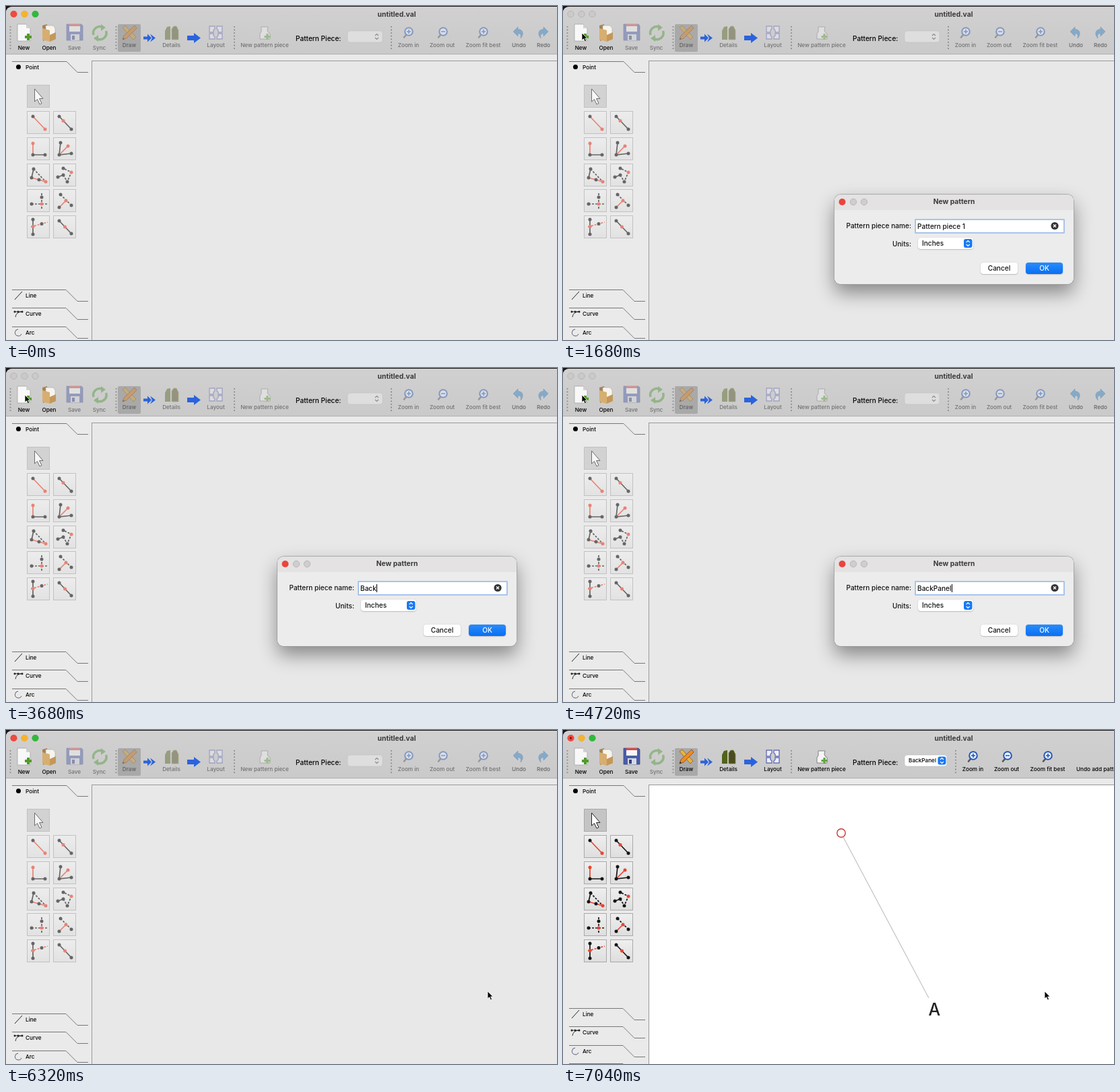
An HTML page that plays this animation: 818 by 496 pixels, repeating every 7120 ms.

```html
<!DOCTYPE html>
<html lang="en">
<head>
<meta charset="utf-8">
<title>New pattern</title>
<style>
  html, body { margin: 0; width: 100%; height: 100%; overflow: hidden; background: #171717; }
  body { position: relative; font: 500 10.1px Inter, "Open Sans", sans-serif; color: #111; }
  svg { position: absolute; left: 0; top: 0; }
  svg text { font-size: 8.2px; fill: #000; }
  text.title { font-size: 10.3px; font-weight: 700; fill: #3b3b3b; }
  text.field { font-size: 10.1px; }
  .mid { text-anchor: middle; }

  /* main window states */
  .dim, .on, .off, .canvas, .zoom, .tabs, .lights, .dialog, .pointer, .name::before, .name::after {
    animation: 7120ms step-end infinite;
  }
  .dim { --low: .44; animation-name: enable; }
  .tools .dim { --low: .62; }
  .on { animation-name: appear; }
  .off { animation-name: vanish; }
  .canvas { animation-name: whiten; }
  .zoom { animation-name: push; }
  .tabs { animation-name: lift; }
  .lights { animation-name: blur; }
  @keyframes enable { 0% { opacity: var(--low); } 92.13%, 100% { opacity: 1; } }
  @keyframes appear { 0% { visibility: hidden; } 92.13%, 100% { visibility: visible; } }
  @keyframes vanish { 0% { visibility: visible; } 92.13%, 100% { visibility: hidden; } }
  @keyframes whiten { 0% { fill: #e8e8e8; } 92.13%, 100% { fill: #fff; } }
  @keyframes push { 0% { transform: none; } 92.13%, 100% { transform: translateX(11px); } }
  @keyframes lift { 0% { transform: none; } 92.13%, 100% { transform: translateY(-8px); } }
  @keyframes blur { 0% { opacity: 1; } 22.47% { opacity: 0; } 80.9%, 100% { opacity: 1; } }

  /* tool glyphs */
  .k, .r, .kd, .rd, .kp, .rp { fill: none; stroke: #161616; stroke-width: 1.7; stroke-linecap: round; }
  .r, .rd, .rp { stroke: #e8442f; }
  .kd, .rd { stroke-dasharray: 3 2; stroke-linecap: butt; }
  .kp, .rp { stroke-width: 5; }

  /* dialog */
  .dialog {
    position: absolute; left: 403px; top: 280px; width: 355px; height: 133px; border-radius: 9px;
    background: linear-gradient(#e4e2e2 0 23px, #ececec 23px);
    box-shadow: 0 0 0 .7px #9a9a9a, 0 13px 28px rgba(0, 0, 0, .42);
    animation-name: open;
  }
  @keyframes open { 0% { visibility: hidden; } 22.47% { visibility: visible; } 80.9%, 100% { visibility: hidden; } }
  .dialog > * { position: absolute; box-sizing: border-box; white-space: pre; line-height: 17px; }
  .dialog .head { left: 0; width: 100%; top: 2px; text-align: center; font-size: 10.3px; font-weight: 700; color: #3b3b3b; }
  .dialog .label { right: 241px; }
  .name {
    left: 121px; top: 38px; width: 219px; height: 18px; padding-left: 2px; background: #fff;
    box-shadow: 0 0 0 1.7px #9fbdea; line-height: 19px !important;
  }
  .name::before { content: "Pattern piece 1"; animation-name: type; }
  .name::after {
    content: ""; display: inline-block; width: 1px; height: 12px; margin-right: -1px;
    vertical-align: -2px; background: #000; animation-name: caret;
  }
  @keyframes type {
    0% { content: "Pattern piece 1"; background: transparent; }
    38.2% { content: "Pattern piece 1"; background: #b3d7ff; }
    44.94% { content: "B"; background: transparent; }
    47.19% { content: "Ba"; }
    49.44% { content: "Bac"; }
    50.56% { content: "Back"; }
    55.06% { content: "BackP"; }
    57.3% { content: "BackPa"; }
    59.55% { content: "BackPan"; }
    61.8% { content: "BackPane"; }
    64.04%, 100% { content: "BackPanel"; background: transparent; }
  }
  @keyframes caret { 0% { opacity: 0; } 44.94% { opacity: 1; } 73% { opacity: 0; } 79.8%, 100% { opacity: 1; } }
  .button {
    top: 101px; height: 17px; width: 55px; border-radius: 4px; text-align: center;
    background: #fff; box-shadow: 0 .5px 1.5px rgba(0, 0, 0, .35);
  }
  .ok { background: linear-gradient(#2a8bfb, #0870f2); color: #fff; }
  .units { top: 64px; left: 124px; width: 82px; padding-left: 6px; text-align: left; }

  .pointer { animation-name: travel; animation-timing-function: ease-in-out; }
  @keyframes travel {
    0%, 8.99% { transform: translate(-12px, -18px); }
    15.73%, 69.66% { transform: translate(28px, 40px); }
    76.4%, 100% { transform: translate(715px, 388px); }
  }
</style>
</head>
<body>
<svg width="818" height="496" viewBox="0 0 818 496">
  <defs>
    <linearGradient id="bar" x2="0" y2="1"><stop stop-color="#d2d0d1"/><stop offset="1" stop-color="#cacaca"/></linearGradient>
    <linearGradient id="cell" x2="0" y2="1"><stop stop-color="#efefef"/><stop offset="1" stop-color="#dedede"/></linearGradient>
    <g id="lens">
      <path d="M-4 5-7 8.500" stroke="#555" stroke-width="2.600" stroke-linecap="round"/>
      <circle r="5.800" fill="#eaf2ff" stroke="#2456b4" stroke-width="2"/>
    </g>
    <path id="turn" d="M-8-1-1-8V-4.500C6-4.500 9 2 3 9 4 3 3 2-1 2V6Z" fill="#3c87c4" stroke="#2c6ba3" stroke-width=".6"/>
    <path id="steps" d="M-2.500-1.500 0-4 2.500-1.500M-2.500 1.500 0 4 2.500 1.500" fill="none" stroke-width="1.200"/>
  </defs>

  <path d="M0 496V11Q0 1 10 1H818V496Z" fill="#eaeaea"/>
  <path d="M0 71V11Q0 1 10 1H818V71Z" fill="url(#bar)"/>
  <path d="M0 71.500H818" stroke="#b1b1b1"/>
  <g fill="#cbcaca" stroke="#b0afaf" stroke-width=".8"><circle cx="11.500" cy="12" r="4.700"/><circle cx="27.500" cy="12" r="4.700"/><circle cx="43.500" cy="12" r="4.700"/></g>
  <g class="lights">
    <circle cx="11.500" cy="12" r="5" fill="#f0493f"/><circle cx="27.500" cy="12" r="5" fill="#f5b32e"/><circle cx="43.500" cy="12" r="5" fill="#30b93c"/>
  </g>
  <circle class="on" cx="11.500" cy="12" r="1.700" fill="#7c1712"/>
  <text class="title mid" x="580" y="15.500">untitled.val</text>
  <g id="grips" fill="none" stroke="#8a8a8a" stroke-width="1.800" stroke-dasharray="1.800 2.800"><path d="M6.500 30V66M163.500 30V66M339 30V66"/></g>

  <!-- file actions -->
  <path d="M17 27H30L36 33V52H17Z" fill="#f8f8f8" stroke="#a2a2a2" stroke-width=".8"/>
  <path d="M30 27V33H36Z" fill="#d3d3d3"/>
  <path d="M33 41V51M28 46H38" stroke="#519b2d" stroke-width="4"/>
  <path d="M54 29 61 27 63 49 55 52Z" fill="#a58254"/>
  <path d="M59 29H70L73 33V50H59Z" fill="#f7f4ed" stroke="#aaa" stroke-width=".6"/>
  <path d="M54 33 65 36V53L54 50Z" fill="#d7ae70"/><path d="M65 43 74 39V49L65 53Z" fill="#c4985b"/>
  <g class="dim">
    <path d="M90 27H112L114 29V51H90Z" fill="#4b5da8" stroke="#35437d" stroke-width=".7"/>
    <path d="M94 27H110V38H94Z" fill="#f6f6f6"/><path d="M94 28.500H110" stroke="#d84b42" stroke-width="3"/>
    <path d="M96 42H109V51H96Z" fill="#d7dae3"/><path d="M98 44H102V50H98Z" fill="#35437d"/>
  </g>
  <g fill="none" stroke="#569b3f" stroke-width="3.500" opacity=".48">
    <path d="M130 43A9.500 9.500 0 0 1 143 31.500M148.500 37A9.500 9.500 0 0 1 135 48.500"/>
    <path d="M141 27 148 32 141 37ZM137 43 130 48 137 53Z" fill="#569b3f" stroke="none"/>
  </g>

  <!-- modes -->
  <rect x="166" y="27" width="34" height="41" rx="2" fill="#aaa9a9"/>
  <g class="dim">
    <path d="M173 32 177 29 193 46 189 50Z" fill="#e9b245" stroke="#8c6115" stroke-width=".8"/>
    <path d="M191 29 194 33 179 48 173 50 175 44Z" fill="#ef8b24" stroke="#7a4a18" stroke-width=".8"/>
    <path d="M173 50 174 47 176 49Z" fill="#222"/>
    <path d="M236 50V37L239 31 244 30V50Z" fill="#53621d"/>
    <path d="M246 50V34L249 30H253L256 36V50Z" fill="#4b4c1f" stroke="#83913d" stroke-width=".8"/>
    <g fill="#eef0fb" stroke="#6a72b4" stroke-width="1.400">
      <path d="M302 30H310V34L308 36V39H302ZM313 30H321V39H315V36L313 34ZM302 41H308V44L310 46V49H302ZM315 41H321V49H313V46L315 44Z"/>
    </g>
    <path d="M379 31H389L388 36Q388 39 392 41V49H377V41Q380 38 379 35Z" fill="#f6f6f6" stroke="#777" stroke-width=".9"/>
    <path d="M388 41V50M383.500 45.500H392.500" stroke="#62a642" stroke-width="3.200"/>
  </g>
  <g fill="#2b63dc">
    <path d="M204 45.500H210V41.500L216 47.500 210 53.500V49.500H204ZM214 41.500 222 47.500 214 53.500 217 47.500Z"/>
    <path d="M269 44H279V40L289 47.500 279 55V51H269Z"/>
  </g>

  <text class="field" x="430" y="51.500">Pattern Piece:</text>
  <g class="off">
    <rect x="507" y="37" width="52" height="17" rx="4" fill="#dedede" stroke="#c2c2c2" stroke-width=".6"/>
    <use href="#steps" x="550.500" y="45.500" stroke="#8c8c8c"/>
  </g>
  <g class="on">
    <rect x="507" y="37" width="63" height="17" rx="4" fill="#fff" stroke="#b7b7b7" stroke-width=".6"/>
    <text x="513" y="48.300">BackPanel</text>
    <rect x="556.500" y="39.500" width="12" height="12" rx="3" fill="#1879f4"/>
    <use href="#steps" x="562.500" y="45.500" stroke="#fff"/>
  </g>

  <g class="zoom">
    <path d="M572 30V66" fill="none" stroke="#8a8a8a" stroke-width="1.800" stroke-dasharray="1.800 2.800"/>
    <g class="dim">
      <use href="#lens" x="598" y="38"/><use href="#lens" x="649" y="38"/><use href="#lens" x="709" y="38"/>
      <path d="M595 38H601M598 35V41M646 38H652M706 38H712M709 35V41" stroke="#2456b4" stroke-width="1.600"/>
      <g id="zoomLabels"></g>
    </g>
  </g>
  <g class="off" opacity=".5">
    <use href="#turn" x="761" y="39"/><use href="#turn" transform="translate(797 39) scale(-1 1)"/>
    <text class="mid" x="761.500" y="61">Undo</text><text class="mid" x="798" y="61">Redo</text>
  </g>
  <text class="on" x="762" y="61">Undo add pattern piece</text>
  <g id="labels"></g>

  <!-- drawing area -->
  <rect class="canvas" x="127.500" y="81.500" width="700" height="420" stroke="#999"/>
  <g class="on">
    <path d="M416 159 543 398" stroke="#c3c3c3" stroke-width="1.200"/>
    <circle cx="413" cy="153" r="6.200" fill="none" stroke="#c83a31" stroke-width="1.400"/>
    <text x="542.500" y="424" style="font-size:25px;fill:#222">A</text>
  </g>

  <!-- tool box -->
  <path d="M9 82.500H90L106 98.500H122" fill="none" stroke="#777"/>
  <circle cx="18.500" cy="90.500" r="3.500"/><text x="29" y="93.700">Point</text>
  <g class="tools" id="tools"></g>
  <g class="tabs">
    <g id="tabs"></g>
    <g fill="none" stroke="#222">
      <path d="M13 436 24 424"/>
      <path d="M14 462Q15 454 24 454M13 454H24" stroke-width=".9"/><path d="M13 454h0M18 454h0M24 454h0" stroke-width="3" stroke-linecap="round"/>
      <path d="M18 480A5 5 0 1 0 23 487" stroke="#555a7a"/>
    </g>
  </g>
</svg>

<div class="dialog">
  <svg width="355" height="133">
    <circle cx="11.500" cy="11" r="5" fill="#e9453c"/>
    <g fill="#cfcdcd" stroke="#b2b0b0" stroke-width=".8"><circle cx="28" cy="11" r="4.700"/><circle cx="44" cy="11" r="4.700"/></g>
  </svg>
  <div class="head">New pattern</div>
  <div class="label" style="top:38px">Pattern piece name:</div>
  <div class="name"></div>
  <div class="label" style="top:65px">Units:</div>
  <div class="button units">Inches</div>
  <div class="button" style="left:217px">Cancel</div>
  <div class="button ok" style="left:284px">OK</div>
  <svg width="355" height="133">
    <circle cx="327" cy="46.500" r="5.600" fill="#333"/>
    <path d="M325 44.500 329 48.500M329 44.500 325 48.500" stroke="#fff" stroke-width="1.400"/>
    <rect x="192" y="66" width="12.500" height="13" rx="3" fill="#1879f4"/>
    <use href="#steps" x="198.250" y="72.500" stroke="#fff"/>
  </svg>
</div>

<svg width="818" height="496" style="pointer-events:none">
  <path class="pointer" d="M0 0V11L2.600 8.700 4.500 13 6.500 12.100 4.600 8H8Z" fill="#000" stroke="#fff" stroke-width=".8"/>
</svg>

<script>
  const fill = (id, parts) => document.getElementById(id).innerHTML = parts.join('');
  const label = ([text, x, y = 61, mode = '']) =>
    `<text class="mid ${mode}" x="${x}" y="${y}" ${mode === 'stale' ? 'opacity=".44"' : ''}>${text}</text>`;

  fill('labels', [
    ['New', 26.5, 64.5], ['Open', 64, 64.5], ['Save', 101.5, 64.5, 'dim'], ['Sync', 138.5, 64.5, 'stale'],
    ['Draw', 183, 61, 'dim'], ['Details', 245.5, 61, 'dim'], ['Layout', 311.5, 61, 'dim'],
    ['New pattern piece', 384, 61, 'dim']
  ].map(label));
  fill('zoomLabels', [['Zoom in', 597.5], ['Zoom out', 647.5], ['Zoom fit best', 708.5]].map(label));

  // Line classes: k black, r red; suffix d dashed, p dots.
  const glyphs = [
    { r: 'M9 8 27 27', kp: 'M9 8h0', rp: 'M27 27h0' },
    { k: 'M9 8 27 27', kp: 'M9 8h0M27 27h0', rp: 'M15 14.5h0' },
    { k: 'M9 26H27', r: 'M9 10V26', kp: 'M9 26h0M27 26h0', rp: 'M9 9h0' },
    { k: 'M11 8 9 26 27 24', r: 'M9 26 22 13', kp: 'M11 8h0M9 26h0M27 24h0', rp: 'M22 13h0' },
    { k: 'M10 8 7 21', kd: 'M10 8 28 27', r: 'M7 21 28 27', kp: 'M10 8h0M7 21h0M18 24h0', rp: 'M28 27h0' },
    { k: 'M7 20 15 17', kd: 'M15 17 21 27 27 13 15 7', kp: 'M7 20h0M15 17h0M21 27h0M15 7h0', rp: 'M27 13h0' },
    { kd: 'M22 6V30M7 22H30', kp: 'M22 12h0M7 22h0', rp: 'M22 22h0' },
    { kd: 'M11 8 27 24', r: 'M19 17 9 27', kp: 'M11 8h0M27 24h0M9 27h0', rp: 'M19 17h0' },
    { k: 'M9 6V28', rd: 'M6 17 31 10', kp: 'M9 6h0M9 28h0M22 12.5h0', rp: 'M9 16.500h0' },
    { k: 'M9 8 27 27', kp: 'M9 8h0M27 27h0', rp: 'M17.5 17h0' }
  ];
  const box = (x, y, paint, art) => `<g transform="translate(${x} ${y})"><g class="dim">
    <rect x=".5" y=".5" width="33" height="33" fill="${paint}" stroke="#a9a9a9"/>${art}</g></g>`;
  const strokes = glyph => Object.entries(glyph).map(([kind, d]) => `<path class="${kind}" d="${d}"/>`).join('');
  fill('tools', [
    box(31, 117, '#c4c4c4', '<path d="M11.500 6V25L15.500 21.500 19 29 22 27.500 18.500 20.500H24Z" fill="#fff" stroke="#222"/>'),
    ...glyphs.map((glyph, i) => box(31 + i % 2 * 39, Math.round(156 + (i >> 1) * 38.8), 'url(#cell)', strokes(glyph)))
  ]);

  fill('tabs', ['Line', 'Curve', 'Arc', ''].map((name, i) => {
    const y = Math.round(421 + i * 27.4) + .5;
    return `<path d="M9 ${y}H89L106 ${y + 17}H122" fill="none" stroke="#777"/><text x="29" y="${y + 11.5}">${name}</text>`;
  }));
</script>
</body>
</html>
```
